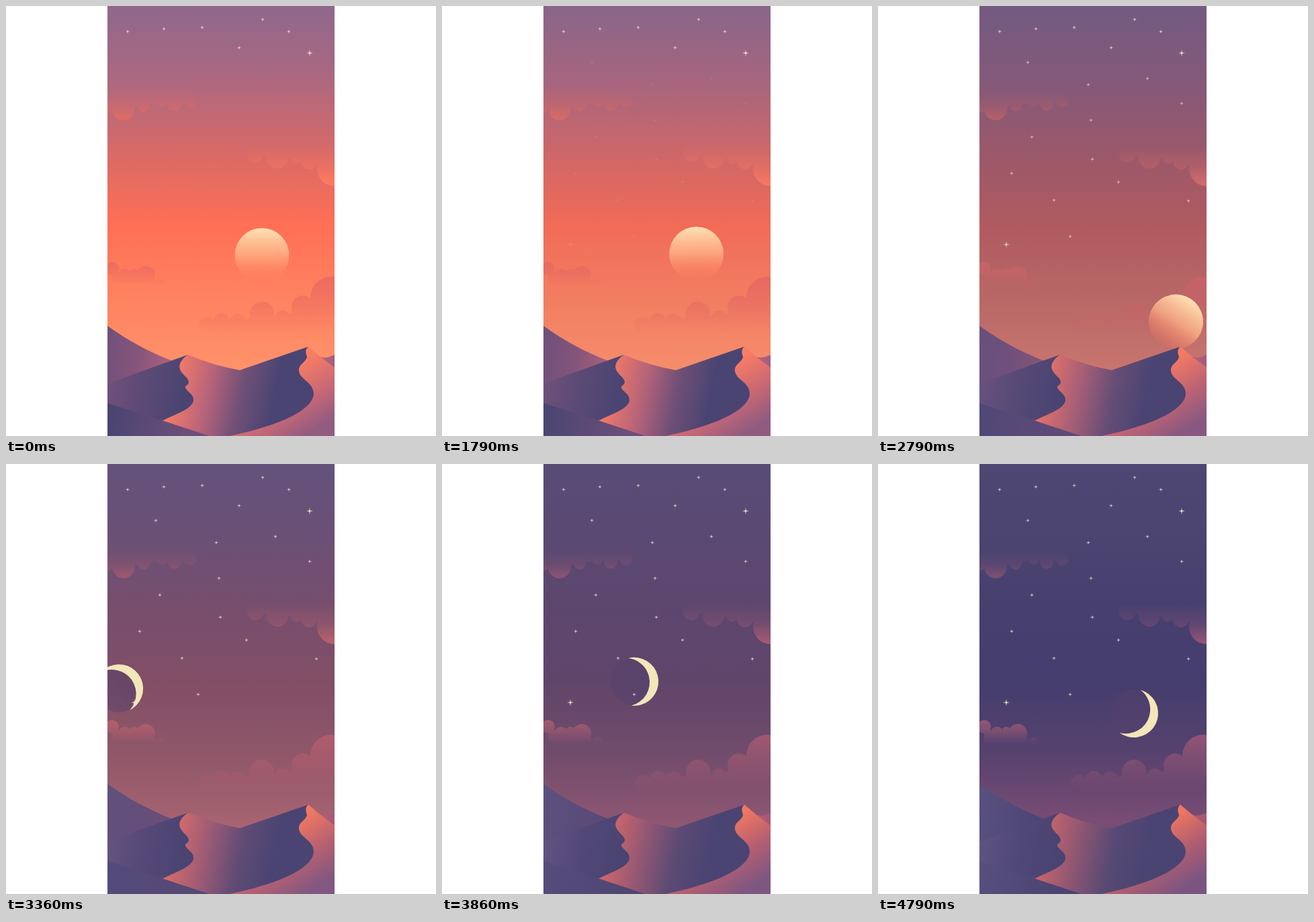
Write an HTML page with a canvas that moves like this. It is 640 by 640 pixels and loops after 6000 ms.

```html
<!DOCTYPE html>
<html lang="en">
<head>
<meta charset="utf-8">
<title>Desert dusk</title>
<style>
  html, body { margin: 0; width: 100%; height: 100%; overflow: hidden; background: #fff; }
  canvas { display: block; }
</style>
</head>
<body>
<canvas width="640" height="640"></canvas>
<script>
const ctx = document.querySelector('canvas').getContext('2d');
const LOOP = 6000, START = 1210, END = 4790, STEPS = 51;
const LEFT = 151, WIDTH = 338;
const RAD = Math.PI / 180;

// Sun and moon ride on one wheel.
const WHEEL = { x: 244.4, y: 526.6, radius: 207, rest: 41.28, turn: 134 };
const SUN_RADIUS = 40.5;
const MOON = { radius: 36, tilt: 26 * RAD, tip: 100.5 * RAD };

const EVENING_STARS = [[181, 38], [235, 34], [292, 32], [347, 62], [382, 20], [421, 38]];
const NIGHT_STARS = [[223, 84], [313, 117], [401, 108], [452, 145], [317, 170], [229, 195],
  [319, 228], [199, 249], [358, 262], [262, 289], [462, 290], [286, 343]];
const EVENING_BRIGHT = [[452, 70]], NIGHT_BRIGHT = [[191, 355]];

// Colours of every gradient are evenly spaced along its line.
const SKY = {
  line: [0, 0, 0, 540],
  dusk: ['#8e688c', '#ac6880', '#d76a68', '#ff6f55', '#ff8260', '#ff926a'],
  night: ['#4e4773', '#4b4471', '#47406f', '#443d6e', '#57426e', '#7c4d74']
};

// Puffs are circles [x, y, radius]; a cloud fades from its solid to its clear height.
const CLOUDS = [
  { clear: 128, solid: 172, fade: [0, .3, 1], dusk: '#e26c63', night: '#845073',
    puffs: [[150, 148, 11], [175, 153, 17], [205, 148, 9], [232, 142, 8], [251, 146, 10], [274, 141, 10]] },
  { clear: 208, solid: 270, fade: [0, .3, 1], dusk: '#ff7d60', night: '#9c5777',
    puffs: [[371, 220, 12.5], [404, 226, 16], [432, 227, 8], [451, 231, 12], [489, 242, 26]] },
  { clear: 416, solid: 380, fade: [0, .6, 1], dusk: '#ec6d60', night: '#965873',
    puffs: [[158, 391, 10], [177, 401, 10], [191, 398, 7], [208, 401, 14], [231, 414, 7]] },
  { clear: 488, solid: 404, fade: [0, .55, 1], dusk: '#ed6c60', night: '#925474',
    puffs: [[299, 475, 12], [321, 469, 12], [345, 470, 12], [381, 458, 18], [412, 464, 11],
            [442, 448, 17], [484, 434, 31]] }
];
for (const cloud of CLOUDS) {
  const { puffs, clear } = cloud;
  const path = cloud.path = new Path2D();
  path.moveTo(puffs[0][0], clear);
  for (const [x, y] of puffs) path.lineTo(x, y);
  path.lineTo(LEFT + WIDTH < puffs.at(-1)[0] + puffs.at(-1)[2] ? LEFT + WIDTH : puffs.at(-1)[0], clear);
  for (const [x, y, r] of puffs) {
    // Wind each puff the same way as the outline, so overlaps stay filled.
    path.moveTo(x + r, y);
    path.arc(x, y, r, 0, 2 * Math.PI, clear < y);
  }
}

const LEFT_RIDGE = 'C262,525 256,533 259,541 C262,549 272,553 272,560 ' +
  'C271,565 266,565 267,568 C269,574 280,578 279,587 C278,599 254,607 233,617';
const RIGHT_RIDGE = 'C445,511 446,517 448,522 C447,530 435,533 436,543 ' +
  'C437,556 458,560 458,577 C457,602 405,625 333,640';
const SHADE = '#4a4472';

const DUNES = [
  { shape: 'M151,476Q195,508 247,528L290,640H151Z', line: [151, 510, 250, 525],
    dusk: ['#72507a', '#88557b', '#b3627d'], night: ['#595080', '#524a7a', SHADE] },
  { shape: 'M460,520Q474,527 489,519V545H460Z', line: [470, 0, 489, 0],
    dusk: ['#b9627c', '#a05f82'], night: ['#b45a70', '#a35674'] },
  { shape: 'M271,519Q308,535 348,542L450,507L470,560L440,640H300L220,620L240,540Z',
    line: [252, 560, 398, 590],
    dusk: ['#f17a68', '#b9647a', '#705077', SHADE], night: ['#c3636c', '#8a5572', '#564974', SHADE] },
  { shape: 'M151,562L247,527.5L271,519' + LEFT_RIDGE + 'L151,600Z', line: [151, 560, 265, 580],
    dusk: ['#70507a', '#5b4975', SHADE], night: ['#5e5483', '#504878', SHADE] },
  { shape: 'M151,591Q195,605 233,617L303,640H151Z', line: [155, 610, 270, 640],
    dusk: [SHADE, '#6e4f7a'], night: ['#574e7e', SHADE] },
  { shape: 'M333,640H489V538Q468,523 450,507' + RIGHT_RIDGE + 'Z', line: [438, 525, 492, 610],
    dusk: ['#fb7f64', '#cf6a73', '#935b80'], night: ['#ee7660', '#b05d70', '#7a5582'] }
];
for (const dune of DUNES) dune.path = new Path2D(dune.shape);

function mix(from, to, k, alpha = 1) {
  const channel = (hex, i) => parseInt(hex.slice(1 + 2 * i, 3 + 2 * i), 16);
  const rgb = [0, 1, 2].map(i => channel(from, i) * (1 - k) + channel(to, i) * k);
  return `rgba(${rgb.map(Math.round)},${alpha})`;
}

function gradient(line, colors) {
  const g = ctx.createLinearGradient(...line);
  colors.forEach((color, i) => g.addColorStop(i / (colors.length - 1), color));
  return g;
}

function blend({ line, dusk, night }, k) {
  return gradient(line, dusk.map((color, i) => mix(color, night[i], k)));
}

// Ease in and out, with a small pull back before the start.
function swing(p) {
  const q = 1 - p;
  return p * p * (3 - 2 * p) - p * p * q * q * (5 - 4.5 * p);
}

function onWheel(turn, draw) {
  const angle = (WHEEL.rest + turn) * RAD;
  ctx.save();
  ctx.translate(WHEEL.x + WHEEL.radius * Math.sin(angle), WHEEL.y - WHEEL.radius * Math.cos(angle));
  ctx.rotate(turn * RAD);
  draw();
  ctx.restore();
}

function disc(radius, fill) {
  ctx.beginPath();
  ctx.arc(0, 0, radius, 0, 2 * Math.PI);
  ctx.fillStyle = fill;
  ctx.fill();
}

function drawSun() {
  disc(SUN_RADIUS, gradient([0, -SUN_RADIUS, 0, SUN_RADIUS],
    ['rgb(255,226,180)', 'rgba(255,180,136,.75)', 'rgba(255,120,88,.1)']));
}

function drawMoon() {
  const { radius, tilt, tip } = MOON;
  ctx.rotate(tilt);
  disc(radius - .5, gradient([-radius, 0, radius, 0], ['rgba(84,64,108,.4)', 'rgba(84,64,108,.65)']));
  ctx.beginPath();
  ctx.arc(0, 0, radius, -tip, tip);
  ctx.arc(2 * radius * Math.cos(tip), 0, radius, Math.PI - tip, tip - Math.PI, true);
  ctx.fillStyle = '#f3e6b9';
  ctx.fill();
}

function drawStars(stars, size, alpha) {
  ctx.globalAlpha = alpha;
  ctx.fillStyle = '#fdeccb';
  for (const [x, y] of stars) {
    ctx.beginPath();
    for (let i = 0; i < 8; i++) {
      const reach = i % 2 ? size * .2 : size;
      ctx.lineTo(x + reach * Math.cos(i * Math.PI / 4), y + reach * Math.sin(i * Math.PI / 4));
    }
    ctx.fill();
  }
  ctx.globalAlpha = 1;
}

function render(time) {
  const step = Math.floor((time - START) / (END - START) * (STEPS - 1)) + 1;
  const progress = Math.max(0, Math.min(1, step / STEPS));
  const dark = .5 - .5 * Math.cos(Math.PI * progress);
  const turn = WHEEL.turn * swing(progress);
  const starlight = Math.min(1, dark * 2);

  ctx.fillStyle = '#fff';
  ctx.fillRect(0, 0, 640, 640);
  ctx.save();
  ctx.beginPath();
  ctx.rect(LEFT, 0, WIDTH, 640);
  ctx.clip();

  ctx.fillStyle = blend(SKY, dark);
  ctx.fillRect(LEFT, 0, WIDTH, 640);
  for (const { clear, solid, fade, dusk, night, path } of CLOUDS) {
    ctx.fillStyle = gradient([0, clear, 0, solid], fade.map(alpha => mix(dusk, night, dark, alpha)));
    ctx.fill(path);
  }
  onWheel(turn, drawSun);
  onWheel(turn - WHEEL.turn, drawMoon);
  drawStars(EVENING_STARS, 3.3, 1);
  drawStars(EVENING_BRIGHT, 5, 1);
  drawStars(NIGHT_STARS, 3.3, starlight);
  drawStars(NIGHT_BRIGHT, 5, starlight);
  for (const dune of DUNES) {
    ctx.fillStyle = blend(dune, dark);
    ctx.fill(dune.path);
  }
  ctx.restore();
}

function tick() {
  render(performance.now() % LOOP);
  requestAnimationFrame(tick);
}
tick();
</script>
</body>
</html>
```
